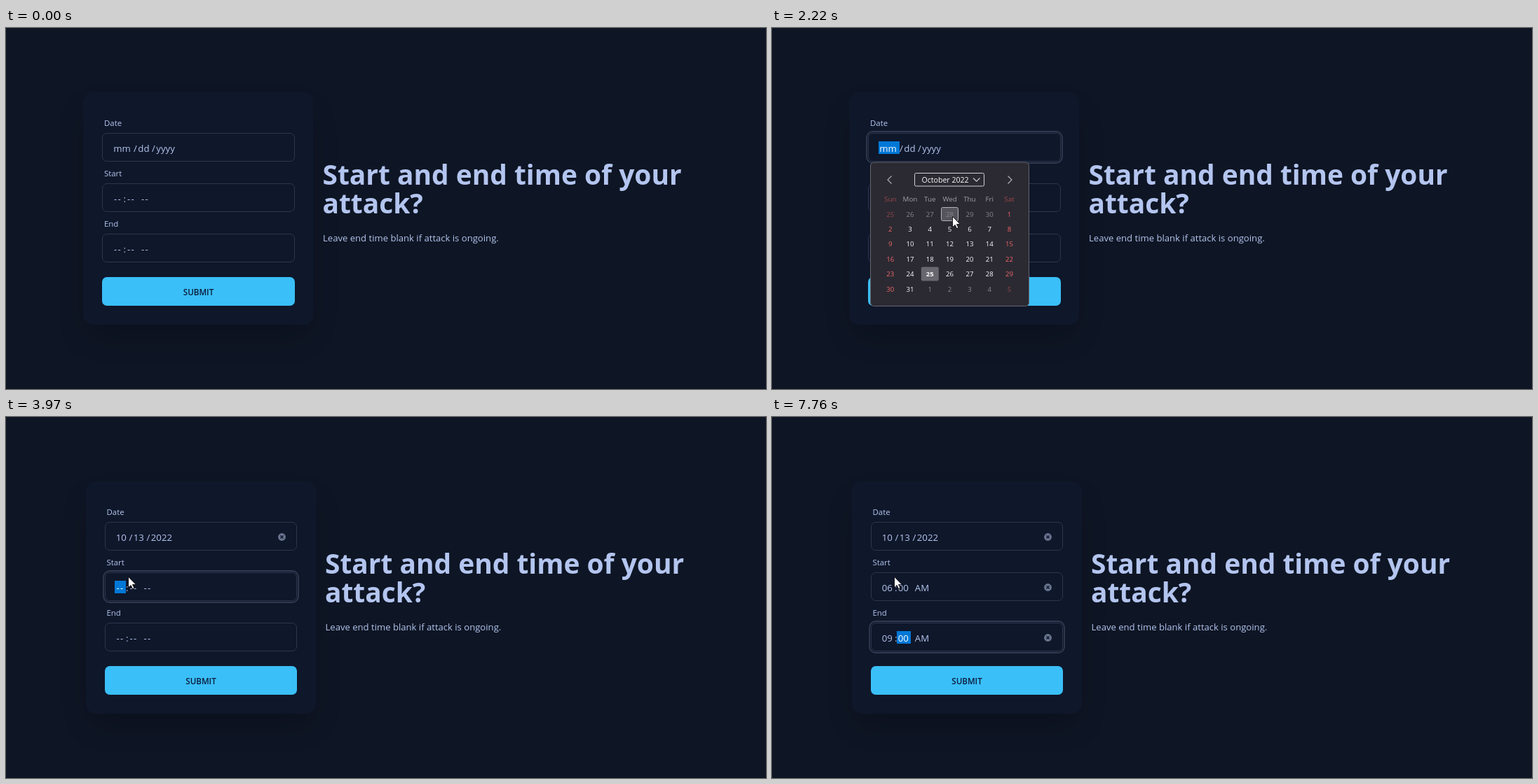
Animation of 1084x516 px, one loop 8000 ms. Source, as an HTML page with a canvas:

```html
<!DOCTYPE html>
<html lang="en">
<head>
<meta charset="utf-8">
<title>Time form</title>
<style>
  html, body { margin: 0; width: 100%; height: 100%; overflow: hidden; background: #0e1524; }
  canvas { display: block; }
</style>
</head>
<body>
<canvas id="stage" width="1084" height="516"></canvas>
<script>
const ctx = document.getElementById('stage').getContext('2d', { alpha: false });
const LOOP = 8000;
const INK = '#b3c5ef', CARD = '#0f172a', BLUE = '#0078d7';

// Times at which the form changes state.
const T = {
  focusDate: 1350, popup: 1410, picked: 2820, focusStart: 3840,
  startHour: 4900, startMinute: 4970, startFull: 5370, startAmPm: 5760,
  focusEnd: 6150, endHour: 7280, endMinute: 7350, endFull: 7760
};

// Pointer moves: first step, last step, step count, way points.
const moves = [
  [520, 1230, 11, [[601, 495], [520, 432], [330, 300], [205, 195], [156, 162], [170, 172], [183, 181]]],
  [1810, 2020, 4, [[183, 181], [253, 265]]],
  [2220, 2750, 9, [[253, 265], [270, 285], [285, 308]]],
  [2950, 3010, 2, [[285, 308], [268, 291]]],
  [3080, 3770, 11, [[268, 291], [205, 255], [161, 237]]],
  [3890, 3970, 2, [[161, 237], [174, 228]]]
];

function along(points, u) {
  const p = u * (points.length - 1);
  const i = Math.min(Math.floor(p), points.length - 2);
  const [a, b] = [points[i], points[i + 1]];
  return [0, 1].map(k => Math.round(a[k] + (b[k] - a[k]) * (p - i)));
}

function pointerAt(t) {
  const move = moves.filter(m => t >= m[0]).pop();
  if (!move) return null;
  const [start, end, steps, points] = move;
  const done = Math.min(steps, 1 + Math.floor((t - start) / (end - start) * (steps - 1) + 1e-6));
  return along(points, done / steps);
}

function text(str, x, y, size, color = INK, { weight = 400, align = 'left', spacing = 0 } = {}) {
  ctx.font = `${weight} ${size}px "Open Sans", "Noto Sans", sans-serif`;
  ctx.letterSpacing = spacing + 'px';
  ctx.textAlign = align;
  ctx.fillStyle = color;
  ctx.fillText(str, x, y);
}

function box(x, y, w, h, r, fill, stroke, line = 1) {
  ctx.beginPath();
  ctx.roundRect(x, y, w, h, r);
  if (fill) { ctx.fillStyle = fill; ctx.fill(); }
  if (stroke) { ctx.strokeStyle = stroke; ctx.lineWidth = line; ctx.stroke(); }
}

function lines(points, color, width) {
  ctx.beginPath();
  points.forEach(([x, y]) => ctx.lineTo(x, y));
  ctx.strokeStyle = color;
  ctx.lineWidth = width;
  ctx.stroke();
}

function drawCard(x) {
  ctx.save();
  ctx.shadowColor = 'rgba(0,0,0,0.25)';
  ctx.shadowBlur = 43;
  ctx.shadowOffsetY = 21;
  box(x + 10, 102, 308, 312, 10, CARD);
  ctx.restore();
  box(x, 92, 328, 332, 14, CARD);
}

function drawClear(x, y) {
  ctx.beginPath();
  ctx.arc(x, y, 5.4, 0, Math.PI * 2);
  ctx.fillStyle = '#69748f';
  ctx.fill();
  lines([[x - 2, y - 2], [x + 2, y + 2]], CARD, 1.4);
  lines([[x + 2, y - 2], [x - 2, y + 2]], CARD, 1.4);
}

function drawField(label, y, left, right, dx, focused, filled) {
  text(label, 140 + dx, y - 10, 11.4);
  box(left + 0.5, y + 0.5, right - left - 1, 40, 6.5, null, '#2c364c');
  if (focused) box(left - 2, y - 2, right - left + 4, 45, 9, null, '#303a51', 1.8);
  if (filled) drawClear(390 + dx, y + 21.5);
}

// Draws one editable part and returns where it ends.
function drawPart(str, x, y, width, active) {
  if (active) {
    ctx.fillStyle = BLUE;
    ctx.fillRect(Math.round(x - 2.5), y + 12, Math.round(width + 5), 18);
  }
  const dash = str === '--';
  text(str, x - (dash ? 0 : 0.7), y + 27, 13.2, active ? '#fff' : INK, { spacing: dash ? 1.3 : 0 });
  return x + width;
}

function drawDate(parts, widths, x, y, active) {
  parts.forEach((part, i) => {
    x = drawPart(part, x, y, widths[i], active && i === 0);
    if (i < 2) text('/', x + 3, y + 27, 13.2);
    x += 10;
  });
}

function drawTime(parts, x, y, active) {
  const width = s => s === '--' ? 11 : s === 'AM' ? 21 : 15;
  x = drawPart(parts[0], x, y, width(parts[0]), active === 0);
  text(':', x + 2.5, y + 27, 13.2);
  x = drawPart(parts[1], x + 8, y, width(parts[1]), active === 1);
  drawPart(parts[2], x + 9, y, width(parts[2]), active === 2);
}

function timeParts(t, hour, hourAt, fullAt) {
  return [t >= hourAt ? hour : '--', ...(t >= fullAt ? ['00', 'AM'] : ['--', '--'])];
}

function drawCalendar(pointer) {
  const colX = c => 168.7 + c * 28.3, rowY = r => 265.7 + r * 21.45;
  box(140.5, 192, 226, 205.5, 5, '#2b2a32', '#66656d');
  lines([[170.5, 211.5], [165, 217], [170.5, 222.5]], '#b5b4ba', 1.1);
  lines([[336.5, 211.5], [342, 217], [336.5, 222.5]], '#b5b4ba', 1.1);
  box(203.5, 207.5, 99, 18.5, 2, null, '#d0d0d4');
  text('October 2022', 213.5, 221, 10.6, '#fbfbfe');
  lines([[287, 214.5], [291.7, 219.2], [296.4, 214.5]], '#d0d0d4', 1.1);

  ['Sun', 'Mon', 'Tue', 'Wed', 'Thu', 'Fri', 'Sat'].forEach((day, c) =>
    text(day, colX(c), 248, 9.8, c % 6 ? '#a09fa6' : '#9d474a', { align: 'center' }));

  const hoverCol = Math.round((pointer[0] - colX(0)) / 28.3);
  const hoverRow = Math.round((pointer[1] - rowY(0)) / 21.45);
  for (let i = 0; i < 42; i++) {
    const c = i % 7, r = Math.floor(i / 7), x = colX(c), y = rowY(r);
    const day = i - 5, inMonth = day > 0 && day < 32, today = day === 25;
    const num = day < 1 ? day + 30 : day > 31 ? day - 31 : day;
    if (today) box(x - 12.5, y - 10, 25, 20, 2, '#68676f');
    if (c === hoverCol && r === hoverRow)
      box(Math.round(x - 12.5) + 0.5, Math.round(y - 10) + 0.5, 24, 19, 2, '#55545d', '#b4b3b9');
    const color = c % 6 ? (inMonth ? '#fbfbfe' : '#88878e') : (inMonth ? '#f2676a' : '#96464a');
    text(num, x, y + 3.8, 9.6, color, { align: 'center', weight: today ? 700 : 400 });
  }
}

function drawPointer([x, y]) {
  const shape = [[0, 0], [0, 15.5], [3.6, 12.2], [6, 17.3], [8.4, 16.2], [6, 11.3], [10.8, 11.3]];
  ctx.beginPath();
  shape.forEach(([px, py]) => ctx.lineTo(x + 0.5 + px, y + 0.3 + py));
  ctx.closePath();
  ctx.fillStyle = '#fff';
  ctx.fill();
  ctx.strokeStyle = '#0a0a0e';
  ctx.lineWidth = 0.9;
  ctx.stroke();
}

function draw(t) {
  const picked = t >= T.picked;
  const dx = picked ? 3.5 : 0, left = picked ? 141 : 137, right = picked ? 415 : 412;
  const pointer = pointerAt(t);
  const onDate = t >= T.focusDate && t < T.focusStart;
  const onStart = t >= T.focusStart && t < T.focusEnd;
  const onEnd = t >= T.focusEnd;

  ctx.fillStyle = '#0e1524';
  ctx.fillRect(0, 0, 1084, 516);
  drawCard(left - 27);
  ctx.fillStyle = '#0a101e';
  ctx.fillRect(0, 515, 1084, 1);

  text('Start and end time of your', 451.5 + dx, 224, 38.9, INK, { weight: 700 });
  text('attack?', 451.5 + dx, 265, 38.9, INK, { weight: 700 });
  text('Leave end time blank if attack is ongoing.', 452 + dx, 305, 13.1);

  drawField('Date', 150, left, right, dx, onDate, picked);
  drawField('Start', 222, left, right, dx, onStart, t >= T.startHour);
  drawField('End', 294, left, right, dx, onEnd, t >= T.endHour);

  const x = 154 + dx;
  if (picked) drawDate(['10', '13', '2022'], [15, 15, 30], x, 150, onDate);
  else drawDate(['mm', 'dd', 'yyyy'], [25, 16, 27], x, 150, onDate);

  const startPart = !onStart ? -1 : t < T.startMinute ? 0 : t < T.startAmPm ? 1 : 2;
  const endPart = !onEnd ? -1 : t < T.endMinute ? 0 : 1;
  drawTime(timeParts(t, '06', T.startHour, T.startFull), x, 222, startPart);
  drawTime(timeParts(t, '09', T.endHour, T.endFull), x, 294, endPart);

  box(left, 356, right - left, 41, 7, '#3abff8');
  text('SUBMIT', (left + right) / 2, 381.5, 11.6, '#0b1b3c', { weight: 600, align: 'center' });

  if (t >= T.popup && !picked) {
    ctx.globalAlpha = t < 1480 ? 0.6 : t < 1550 ? 0.98 : 1;
    drawCalendar(pointer);
    ctx.globalAlpha = 1;
  }
  if (pointer) drawPointer(pointer);
}

const begin = performance.now();
function frame() {
  draw((performance.now() - begin) % LOOP);
  requestAnimationFrame(frame);
}
frame();
</script>
</body>
</html>
```
